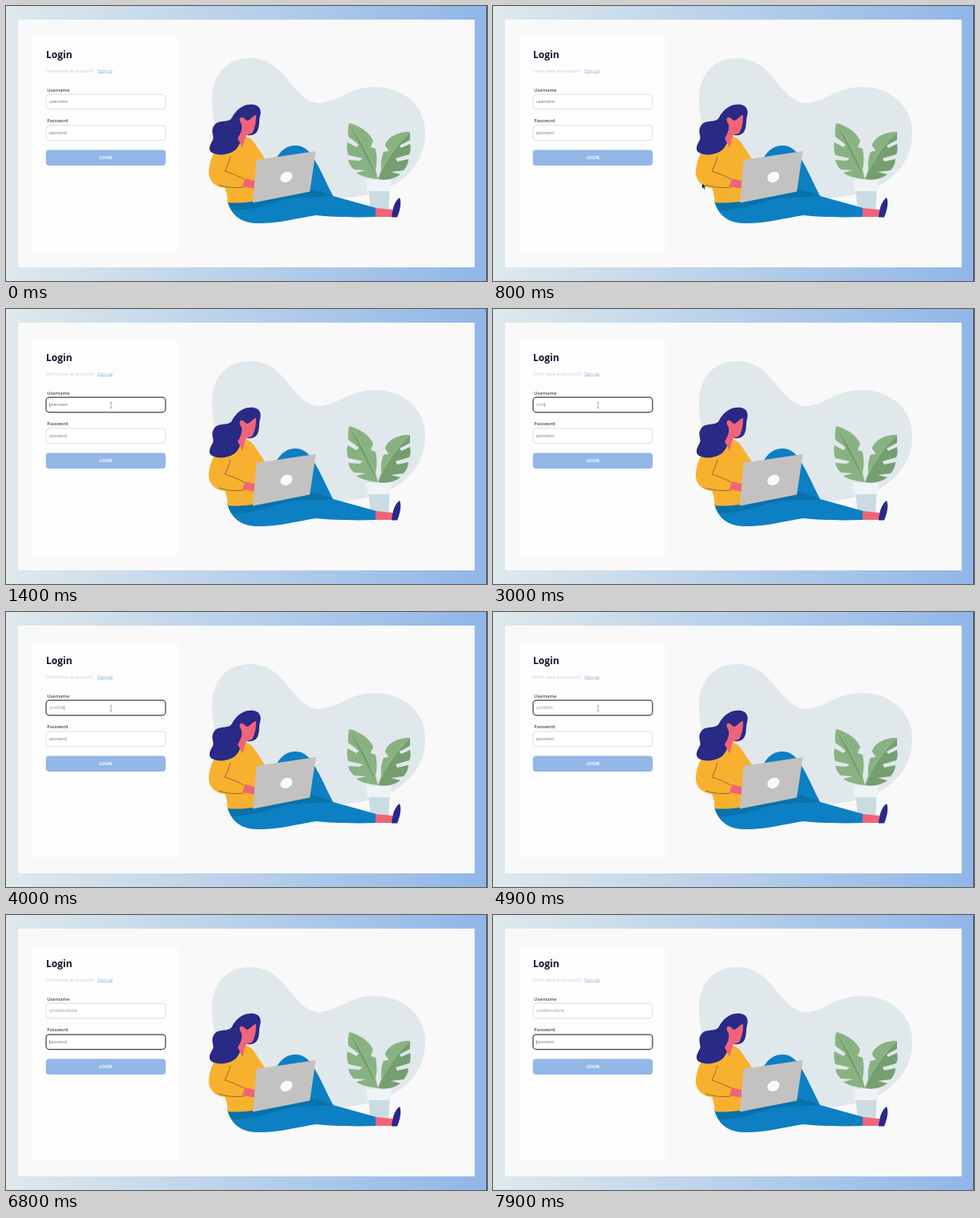
An HTML page that plays this animation: 600x343 px, repeating every 8 s.

```html
<!DOCTYPE html>
<html lang="en">
<head>
<meta charset="utf-8">
<title>Login form</title>
<style>
  html, body { margin: 0; width: 100%; height: 100%; overflow: hidden; }
  svg { display: block; width: 600px; height: 343px; }
  text { font-family: "Open Sans", sans-serif; font-size: 5.6px; }
  .label { font-weight: 600; fill: #48484e; }
  .value { font-family: "Liberation Sans", Arial, sans-serif; font-size: 5.17px; fill: #808080; }
  .typed { fill: #a0a0a0; }
  .box { fill: #fff; stroke: #dadadc; stroke-width: .9; }
  .box.focus { stroke: #414146; stroke-width: 1.25; }
  .navy { fill: #292986; }
  .skin { fill: #f0647a; }
  .blue { fill: #0d7fc3; }
  .shade { fill: #0872a9; }
  .leaf { fill: #89b282; }
  .leaf-dark { fill: #759f70; }
  .line { fill: none; stroke: #4a3f3c; stroke-width: .6; }
  .rib { fill: none; stroke: #a9c9a0; stroke-width: .6; }
</style>
</head>
<body>
<svg viewBox="0 0 600 343">
  <defs>
    <linearGradient id="sky">
      <stop stop-color="#dfe9ec"/><stop offset="1" stop-color="#90b6e8"/>
    </linearGradient>
  </defs>
  <rect width="600" height="343" fill="url(#sky)"/>
  <rect x="599" width="1" height="343" fill="#3c4c68"/>
  <rect x="15" y="17" width="569.5" height="309" fill="#f9f9f9"/>
  <rect x="33.5" y="38" width="181.5" height="268.5" fill="#fdfdfd"/>

  <!-- form -->
  <text x="50" y="65.4" style="font-size:12px;font-weight:700" fill="#10142c">Login</text>
  <text x="50" y="83" style="font-size:5.5px" fill="#c9c9cb">Don't have an account?</text>
  <text x="114" y="82.6" style="font-size:5.5px" fill="#7fb0e2" text-decoration="underline">Sign up</text>
  <text class="label" x="51.3" y="106.8">Username</text>
  <rect id="userBox" class="box" x="50" y="110.2" width="149" height="18.6" rx="4"/>
  <text id="userText" class="value" x="54" y="121.3"></text>
  <text class="label" x="51.3" y="145.4">Password</text>
  <rect id="passBox" class="box" x="50" y="149" width="149" height="18.6" rx="4"/>
  <text class="value" x="54" y="160.2">password</text>
  <rect id="caret" width=".6" height="5.4" fill="#777"/>
  <rect x="49.7" y="179.6" width="149.5" height="19.4" rx="4" fill="#93b7e7"/>
  <text x="124.5" y="191.2" text-anchor="middle" style="font-size:5.2px;font-weight:700" fill="#fff">LOGIN</text>

  <!-- backdrop -->
  <path fill="#e0e8ec" d="M257 116C257 85 276 65 304 65C329 65 341 79 354 95C367 111 377 121 391 121C414 120 427 101 460 101C498 101 523 127 523 158C523 186 509 207 487 221C466 235 430 240 400 241L300 230L284 190C264 172 257 143 257 116Z"/>

  <!-- plant -->
  <path fill="#cbdbe2" d="M452 226H479L477 256H455Z"/>
  <path fill="#eff3f5" d="M449 217H481L479 231H451Z"/>
  <path class="leaf" d="M428 146C441 149 453 157 458 168L455 176L461 178C463 187 463 196 461 204L464 216C454 215 444 213 437 208L449 205L434 204C430 200 428 197 427 192L441 193L445 190L427 186C425 181 425 175 426 170L437 176L440 173L427 163C426 157 427 151 428 146Z"/>
  <path class="leaf-dark" d="M428 146Q450 176 464 216Q446 184 428 146Z"/>
  <path class="leaf-dark" d="M504 157C490 157 476 163 473 174L478 181L471 182C468 190 468 197 468 205L464 216C474 218 484 216 492 210L480 207L496 205C500 200 502 196 502 191L488 194L486 190L503 185C505 181 505 177 504 172L493 177L491 174L504 167Z"/>
  <path class="leaf" d="M504 157C490 157 476 163 473 174L478 181L471 182C468 190 468 197 468 205L464 216C472 194 487 174 504 157Z"/>
  <path class="rib" d="M428 146Q451 177 464 216Q477 182 504 157"/>

  <!-- woman -->
  <path class="blue" d="M336 192C343 179 351 174 361 174C371 174 378 180 384 190C393 205 400 222 408 237L370 245L320 220Z"/>
  <path class="blue" d="M276 243L309 244L378 232L408 237L462 252V263C433 264 404 263 387 261C361 265 337 272 312 271C291 270 280 259 276 243Z"/>
  <path class="shade" d="M277 245L310 243L376 228Q392 230 408 237C384 239 362 237 342 243C320 250 302 255 282 255Z"/>
  <path class="skin" d="M461 252L482 254L482 263L461 263Z"/>
  <path class="navy" d="M481 263.5C482 252 485 243 491 239C494 246 491 256 488 263.5Z"/>
  <path fill="#f8b12f" d="M288 163C299 161 306 164 310 171L324 192L320 242C297 246 286 246 276 245C277 239 275 232 273 227C261 226 252 218 253 205C254 195 257 186 262 180Z"/>
  <path class="navy" d="M286 133C292 125 301 122 309 123C316 124 319 130 317 137C315 144 317 150 313 157C309 162 303 162 299 160C292 166 292 176 284 181C276 186 264 187 257 183C251 179 255 172 258 167C260 162 255 157 259 150C263 142 273 145 279 142C283 140 282 137 286 133Z"/>
  <path class="skin" d="M293 139C297 138 298 143 301 143C306 141 307 137 312 136C312 144 311 151 308 157C306 161 302 159 300 161L298 166L295 177L289 165C293 159 296 151 293 146C291 143 291 140 293 139Z"/>
  <path class="line" d="M280 188Q277 199 273 206Q284 209 297 216"/>
  <path class="line" d="M265 223Q280 228 297 226"/>
  <path class="skin" d="M298 215L313 219L312 228L295 225Z"/>
  <path fill="#c3c2c1" d="M312.5 192L386.5 181L379 231.5L308 245.5Z"/>
  <ellipse cx="349.7" cy="213.4" rx="7.9" ry="6.2" fill="#fafafa" transform="rotate(-30 349.7 213.4)"/>

  <path id="arrow" fill="#111" stroke="#fff" stroke-width=".4" d="M0 0V7L1.7 5.5L2.9 8L4 7.5L2.9 5.1H5Z"/>
  <path id="beam" fill="none" stroke="#888" stroke-width=".7" d="M-1.3 -3.4H1.3M-1.3 3.4H1.3M0 -3.4V3.4"/>
</svg>
<script>
const LOOP = 8000, USER = "yorelidevattone";
const KEY_TIMES = [2500, 2600, 2700, 3000, 3200, 3400, 3600, 4000, 4300, 5100, 5400, 5500, 6000, 6200, 6500];
const CARET_OFF = [[2000, 2500], [4900, 5100], [7400, 7900]];
const FOCUS = 1400, TAB = 6800, MOVE = 700, HIDE = 5600;
const $ = id => document.getElementById(id);
const show = (id, on) => $(id).setAttribute("visibility", on ? "visible" : "hidden");

function drawPointer(t) {
  // The hand slows down as it nears the field.
  const step = Math.floor((t - MOVE) / 100);
  const rest = step >= 7 ? 0 : 0.49 ** step;
  const x = 131 + 265 * rest, y = 120 + 206 * rest;
  const visible = t >= MOVE && t < HIDE, inField = x < 199 && y < 129;
  for (const id of ["arrow", "beam"]) {
    $(id).setAttribute("transform", `translate(${x} ${y})`);
    show(id, visible && (id === "beam") === inField);
  }
}

function draw(t) {
  const count = KEY_TIMES.filter(k => k <= t).length;
  const user = $("userText"), caret = $("caret"), inPass = t >= TAB;
  user.textContent = count ? USER.slice(0, count) : "username";
  user.classList.toggle("typed", count > 0);
  $("userBox").classList.toggle("focus", t >= FOCUS && !inPass);
  $("passBox").classList.toggle("focus", inPass);

  const width = count && !inPass ? user.getComputedTextLength() : 0;
  caret.setAttribute("x", 54 + width);
  caret.setAttribute("y", inPass ? 155.8 : 117);
  show("caret", t >= FOCUS && !CARET_OFF.some(([a, b]) => t >= a && t < b));
  drawPointer(t);
}

const start = performance.now();
function tick() {
  draw((performance.now() - start) % LOOP);
  requestAnimationFrame(tick);
}
tick();
</script>
</body>
</html>
```
